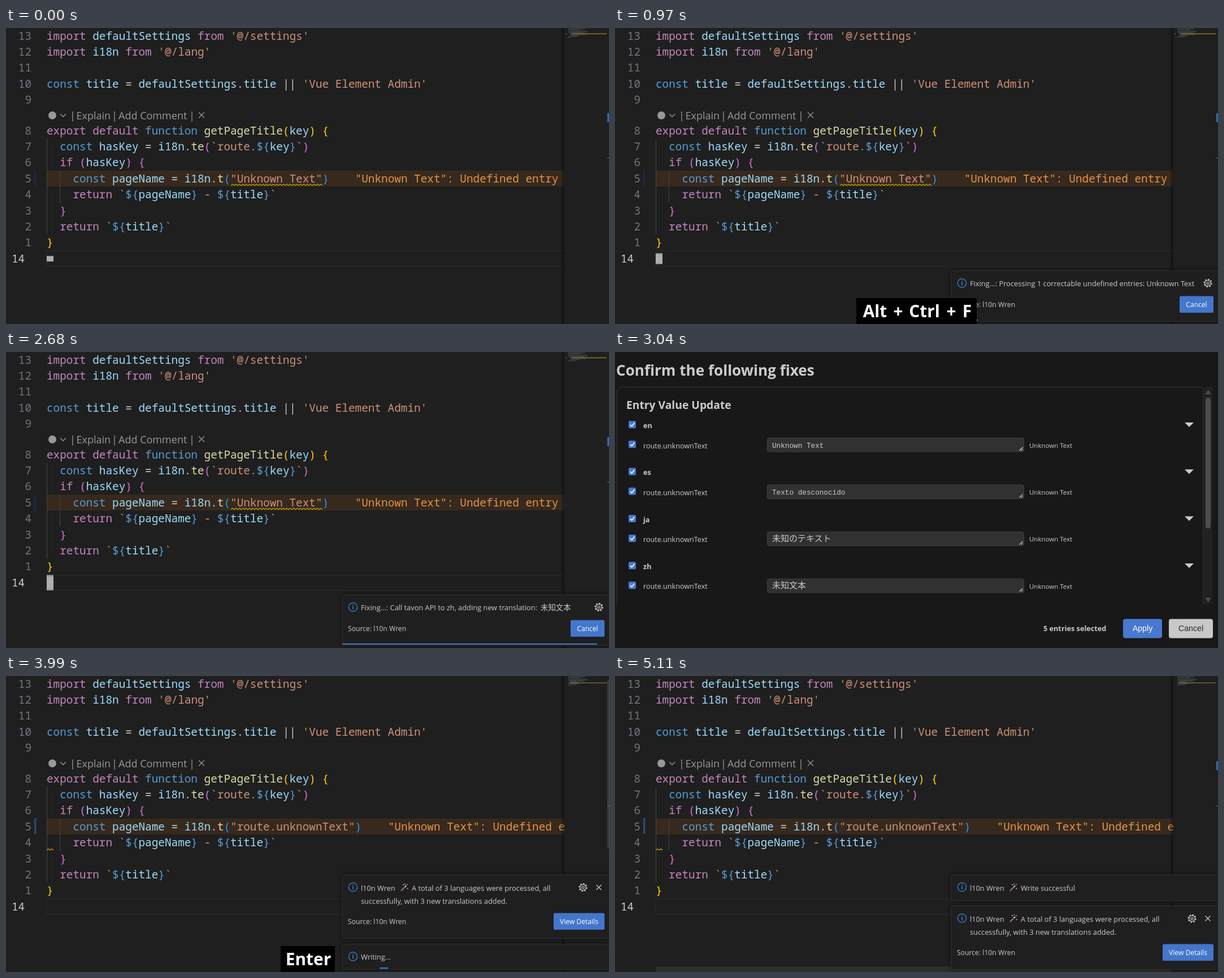
An HTML page that plays this animation: 1067x525 px, repeating every 5.59 s.

```html
<!DOCTYPE html>
<html lang="en">
<head>
<meta charset="utf-8">
<title>Fixing undefined entries</title>
<style>
html, body { margin: 0; width: 100%; height: 100%; overflow: hidden; background: #1f1f1f; }
svg { display: block; width: 1067px; height: 525px; }
text { white-space: pre; font-family: "Open Sans", "Noto Sans", "Noto Sans CJK JP", "Noto Sans CJK SC", sans-serif; }
.code { font: 19.35px "Noto Sans Mono", "DejaVu Sans Mono", monospace; }
.area { font-family: "Liberation Mono", "Noto Sans CJK JP", "Noto Sans CJK SC", monospace; }
.arial { font-family: "Liberation Sans", sans-serif; }
.bold { font-weight: 700; }
.end { text-anchor: end; }
.mid { text-anchor: middle; }
.k { fill: #c586c0 } .b { fill: #569cd6 } .v { fill: #9cdcfe } .f { fill: #dcdcaa } .s { fill: #ce9178 }
.y { fill: #ffd700 } .p { fill: #da70d6 } .n { fill: #179fff } .w { fill: #cccccc }
.h { fill: #e2954a }
.card { fill: #1f1f1f; stroke: #303031; filter: drop-shadow(0 0 4px #0007); }
.line { fill: none; stroke: #ccc; stroke-width: 1.2; }
#cursor, #seek { transform-box: fill-box; transform-origin: center; }
#bar { transform-box: fill-box; transform-origin: left; }
</style>
</head>
<body>
<svg viewBox="0 0 1067 525" id="stage"></svg>
<script>
const LOOP = 5590;
const BLUE = '#4476cb';
const CH = 11.61;
const $ = id => document.getElementById(id);

// ---- drawing helpers ----
const text = (x, y, size, str, fill = '#ccc', cls = '') =>
  `<text x="${x}" y="${y}" font-size="${size}" fill="${fill}" class="${cls}">${str}</text>`;
const rect = (x, y, w, h, fill, more = '') =>
  `<rect x="${x}" y="${y}" width="${w}" height="${h}" fill="${fill}" ${more}/>`;
const path = (d, stroke, width = 1, more = '') =>
  `<path d="${d}" fill="none" stroke="${stroke}" stroke-width="${width}" ${more}/>`;
const group = (id, ...parts) => `<g id="${id}">${parts.join('')}</g>`;
const cross = (x, y, r, stroke) =>
  path(`M${x - r} ${y - r}l${2 * r} ${2 * r}m0 ${-2 * r}l${-2 * r} ${2 * r}`, stroke, 1.2);

// Tokens come as class, string, class, string...
const code = (x, mid, ...tokens) => {
  let spans = '';
  for (let i = 0; i < tokens.length; i += 2) spans += `<tspan class="${tokens[i]}">${tokens[i + 1]}</tspan>`;
  return `<text class="code" x="${x}" y="${mid + 6.5}">${spans}</text>`;
};
const wave = (x0, x1, y) => {
  let d = `M${x0} ${y}`;
  for (let x = x0, up = true; x < x1; x += 3, up = !up) d += `l3 ${up ? -2.4 : 2.4}`;
  return path(d, '#cca700', 1.2);
};

// ---- editor ----
const row = n => n > 8 ? 14 + (13 - n) * 28.4 : 182 + (8 - n) * 28.4;
const LAST = row(0);

const numbers = () => {
  let out = '';
  for (let n = 13; n > 0; n--)
    out += `<text class="code end" x="45" y="${row(n) + 6.5}" fill="#6e7681">${n}</text>`;
  return out + `<text class="code" x="10" y="${LAST + 6.5}" fill="#ccc">14</text>`;
};

const fifth = (key, hintCol) =>
  code(72, row(5), 'b', '    const ', 'v', 'pageName ', 'w', '= ', 'v', 'i18n', 'w', '.', 'f', 't',
    'n', '(', 's', `"${key}"`, 'n', ')') +
  code(72 + hintCol * CH, row(5), 'h', '"Unknown Text": Undefined entry');

const lens = () =>
  '<circle cx="82" cy="155" r="7" fill="#999"/>' +
  path('M96 152.5l5 5 5-5', '#999', 1.3) +
  [118, 192, 329].map(x => text(x, 161.5, 18, '|', '#999', 'mid')).join('') +
  text(124.5, 161.5, 18, 'Explain', '#999') + text(199, 161.5, 18, 'Add Comment', '#999') +
  cross(346, 154.5, 5, '#999');

const minimap = () => {
  const lines = [[0, 30, 1], [0, 22, 2.5], [0, 34, 5], [0, 32, 7], [3, 24, 8.5], [3, 13, 10], [6, 26, 11.5],
    [3, 16, 13], [0, 14, 15], [0, 2, 16.5]];
  return rect(988, 0, 79, 525, '#1f1f1f') +
    lines.map(([x, w, y], i) => rect(995 + x, y, w, 1, i % 2 ? '#5d7f92' : '#6f6d80', 'opacity=".55"')).join('');
};

const hatch = () => {
  let d = '';
  for (let y = 255; y < 282; y += 3.5) d += `M50 ${y}l3.5 -2.5`;
  return path(d, '#3f7bd0', 1.5);
};

const editor = () =>
  rect(0, 0, 1067, 525, '#1f1f1f') +
  rect(72, 253, 916, 28, '#37291d') +
  rect(72, 395.5, 930, 27.5, 'none', 'stroke="#2c2c2c"') +
  path('M72.5 197V366', '#414744') + path('M95.5 253V310', '#414744') +
  numbers() + lens() +
  code(72, row(13), 'k', 'import ', 'v', 'defaultSettings ', 'k', 'from ', 's', "'@/settings'") +
  code(72, row(12), 'k', 'import ', 'v', 'i18n ', 'k', 'from ', 's', "'@/lang'") +
  code(72, row(10), 'b', 'const ', 'v', 'title ', 'w', '= ', 'v', 'defaultSettings', 'w', '.', 'v', 'title ',
    'w', '|| ', 's', "'Vue Element Admin'") +
  code(72, row(8), 'k', 'export default ', 'b', 'function ', 'f', 'getPageTitle', 'y', '(', 'v', 'key', 'y', ') {') +
  code(72, row(7), 'b', '  const ', 'v', 'hasKey ', 'w', '= ', 'v', 'i18n', 'w', '.', 'f', 'te', 'p', '(',
    's', '`route.', 'b', '${', 'v', 'key', 'b', '}', 's', '`', 'p', ')') +
  code(72, row(6), 'k', '  if ', 'p', '(', 'v', 'hasKey', 'p', ') {') +
  code(72, row(4), 'k', '    return ', 's', '`', 'b', '${', 'v', 'pageName', 'b', '}', 's', ' - ',
    'b', '${', 'v', 'title', 'b', '}', 's', '`') +
  code(72, row(3), 'p', '  }') +
  code(72, row(2), 'k', '  return ', 's', '`', 'b', '${', 'v', 'title', 'b', '}', 's', '`') +
  code(72, row(1), 'y', '}') +
  group('before', fifth('Unknown Text', 47), wave(398, 560, 279.5), rect(50, 253, 3, 28, '#1f2547')) +
  group('after', fifth('route.unknownText', 52), wave(72, 84, 309)) +
  group('changed', hatch()) +
  rect(72, 395.5, 12, 27.5, '#aeafad', 'id="cursor"') +
  rect(72, 515, 916, 10, '#2e2e2e', 'id="hscroll"') +
  minimap() +
  group('mapBefore', rect(1002, 9.5, 61, 1.5, '#8f7a1d'), rect(990, 9.5, 2, 1.5, '#3f6fae')) +
  group('mapAfter', rect(995, 11.5, 68, 1.5, '#6f6a2a')) +
  group('edge', rect(981, 0, 7, 525, 'url(#shade)'), rect(1064, 151, 3, 16, '#2a6fb0')) +
  rect(1064, 8, 3, 297, '#3b3b3b', 'id="slider"') +
  rect(1064, 230, 3, 1, '#777');

// ---- notifications ----
const info = y => `<circle cx="614" cy="${y}" r="7.6" fill="none" stroke="#3f86e0" stroke-width="1.3"/>` +
  rect(613.3, y - 1.5, 1.5, 5.5, '#3f86e0') + rect(613.3, y - 4.2, 1.5, 1.7, '#3f86e0');
const gear = (x, y) =>
  `<circle class="line" cx="${x}" cy="${y}" r="5.2"/><circle class="line" cx="${x}" cy="${y}" r="2"/>` +
  `<circle class="line" cx="${x}" cy="${y}" r="6.6" style="stroke-width:2;stroke-dasharray:2.6 2.58"/>`;
const wand = y => path(`M699 ${y + 6}l7-7`, '#8a8088', 2) +
  path(`M706 ${y - 1}l2-2`, '#eee', 2) +
  [[703, -5, '#f0a860'], [710, -5, '#e8788c'], [710.5, 2, '#f0a860'], [706, -6, '#e8788c']]
    .map(([x, dy, c]) => `<circle cx="${x}" cy="${y + dy}" r="1.1" fill="${c}"/>`).join('');

const card = (top, h) => rect(594.5, top + .5, 474, h, '', 'class="card" rx="4"') + info(top + 22.5);
const say = (x, y, s) => text(x, y, 12.8, s);
const button = (x, y, w, s) => rect(x, y, w, 29.5, BLUE, 'rx="2"') + text(x + w / 2, y + 19.2, 12.1, s, '#fff', 'mid');
const source = y => text(605, y, 12.2, 'Source: l10n Wren');
const brand = y => say(628, y + 5.5, 'l10n Wren') + wand(y);
const clip = (id, y, h) => `<clipPath id="${id}"><rect x="588" y="${y}" width="479" height="${h}"/></clipPath>`;
const slot = (id, clipId, ...parts) => `<g clip-path="url(#${clipId})">${group(id, ...parts)}</g>`;

const fixing = (id, top, first, tail = '', second = '') => group(id, card(top, top > 420 ? 90 : 113),
  gear(1049, top + 22.5), say(628, top + 28, 'Fixing...: ' + first),
  text(946, top + 28, 13.4, tail), text(628, top + 51, 13.4, second));
const call = lang => `Call tavon API to ${lang}, adding new translation:`;

const toasts = () =>
  group('fix', slot('fixIn', 'clipFix',
    fixing('msg0', 430, 'Processing 1 correctable undefined entries: Unknown Text'),
    fixing('msg1', 407, call('es'), 'Texto', 'desconocido'),
    fixing('msg2', 407, call('ja'), '未知のテキス', 'ト'),
    fixing('msg3', 430, call('zh'), '未知文本'),
    source(494.5), button(999, 475.5, 60, 'Cancel'),
    rect(595, 517, 472, 2, '#3f7bd0', 'id="bar"'))) +
  slot('done', 'clipDone', card(352, 46), brand(375), say(718, 380.5, 'Write successful')) +
  group('sum', slot('sumIn', 'clipSum', card(352, 113), brand(375),
    say(718, 380.5, 'A total of 3 languages were processed, all'),
    say(628, 403.5, 'successfully, with 3 new translations added.'),
    gear(1021, 375), cross(1049, 375, 4.5, '#ccc'), source(439.5), button(969, 420.5, 90, 'View Details'))) +
  group('write', slot('writeIn', 'clipWrite', card(475, 45), say(628, 503, 'Writing...'),
    rect(595, 517, 9.44, 2, '#3f7bd0', 'id="seek"')));

// ---- confirmation page ----
const check = y => rect(24, y - 6.5, 13, 13, '#4878cf', 'rx="2"') + path(`M27 ${y}l2.8 3 4.6-6`, '#fff', 1.7);
const entry = (lang, value, i) => {
  const y = i * 83.3;
  const size = i < 2 ? 12.7 : 15;
  return check(128.8 + y) + text(50, 135 + y, 12.6, lang, '#ccc', 'bold') +
    `<path d="M1008 ${125 + y}h16l-8 8z" fill="#ccc"/>` +
    check(163.8 + y) + text(50, 170.5 + y, 12.6, 'route.unknownText') +
    rect(269.5, 152.5 + y, 454, 24.5, '#313131', 'rx="3" stroke="#3f3f3f"') +
    text(278, 169.5 + y, size, value, '#ccc', 'area') +
    path(`M715.5 ${175 + y}l6-6m-2.5 6l2.5-2.5`, '#ddd', 1.1) +
    text(733, 169.8 + y, 11.5, 'Unknown Text');
};
const dialog = () => group('dialog',
  rect(0, 0, 1067, 525, '#181818'),
  text(2, 42, 26.1, 'Confirm the following fixes', '#ccc', 'bold'),
  path('M3.5 447V70q0-8 8-8H1033q8 0 8 8V447', '#363636'),
  text(20, 101, 19.3, 'Entry Value Update', '#ccc', 'bold'),
  ['Unknown Text', 'Texto desconocido', '未知のテキスト', '未知文本']
    .map((v, i) => entry(['en', 'es', 'ja', 'zh'][i], v, i)).join(''),
  rect(1042, 62, 15, 385, '#212121'),
  rect(1045, 81, 9, 232, '#4d4d4d', 'rx="4.5"'),
  '<path d="M1044.5 75h10l-5-8zM1044.5 436h10l-5 8z" fill="#4d4d4d"/>',
  text(758, 494.5, 12.7, '5 entries selected', '#ccc', 'bold'),
  rect(899, 473.5, 69, 34, '#4878cf', 'rx="4"'), text(933.5, 495, 14.2, 'Apply', '#fff', 'arial mid'),
  rect(980, 473.5, 78, 34, '#c8c8c8', 'rx="4"'), text(1019, 495, 14.2, 'Cancel', '#2a2a2a', 'arial mid'));

// ---- pressed keys ----
const keys = (id, x, w, parts) => group(id, rect(x, 479, w, 46, '#000'),
  parts.map(([cx, s]) => text(cx, 512.5, 29.8, s, '#fff', 'bold mid')).join(''));

$('stage').innerHTML =
  '<defs><linearGradient id="shade"><stop stop-color="#000" stop-opacity="0"/>' +
  '<stop offset="1" stop-color="#000" stop-opacity=".4"/></linearGradient>' +
  clip('clipFix', 402, 123) + clip('clipDone', 347, 56) + clip('clipSum', 347, 123) + clip('clipWrite', 470, 55) +
  '</defs>' + editor() + toasts() + dialog() +
  keys('chord', 427, 213, [[460, 'Alt'], [501, '+'], [547.5, 'Ctrl'], [595, '+'], [623, 'F']]) +
  keys('enter', 486, 96, [[535, 'Enter']]);

// ---- motion ----
const play = (id, ...frames) => $(id).animate(
  frames.map(([ms, props, easing = 'linear']) => ({ offset: ms / LOOP, easing, ...props })),
  { duration: LOOP, iterations: Infinity });
const fade = opacity => ({ opacity });
const show = (id, from, to) => {
  const keys = [[from, fade(1), 'step-end'], [to, fade(0), 'step-end']];
  if (from > 0) keys.unshift([0, fade(0), 'step-end']);
  if (to < LOOP) keys.push([LOOP, fade(0)]);
  play(id, ...keys);
};
const slideIn = (id, start, height) => {
  const low = { transform: `translateY(${height}px)`, opacity: 0 };
  const up = { transform: 'translateY(0px)', opacity: 1 };
  play(id, [0, low], [start, low, 'ease-out'], [start + 300, up], [LOOP, up]);
};

const BACK = 3370, WRITTEN = 4060;

show('before', 0, BACK);
show('mapBefore', 0, BACK);
show('after', BACK, LOOP);
show('mapAfter', BACK, LOOP);
show('changed', 3700, LOOP);
show('dialog', 2940, BACK);
show('chord', 620, 1720);
show('enter', BACK, 4340);

show('fix', 600, 2940);
show('msg0', 0, 1230);
show('msg1', 1230, 1600);
show('msg2', 1600, 1960);
show('msg3', 1960, LOOP);
slideIn('fixIn', 600, 90);
show('write', BACK, WRITTEN);
slideIn('writeIn', 3383, 45);
slideIn('sumIn', 3466, 113);
slideIn('done', 4740, 46);

const moved = y => ({ transform: `translateY(${y}px)` });
play('sum', [0, moved(0), 'step-end'], [WRITTEN, moved(55), 'step-end'], [LOOP, moved(55)]);

play('edge', [0, fade(1), 'step-end'], [BACK, fade(0), 'step-end'], [3700, fade(1)], [LOOP, fade(1)]);
play('slider', [0, fade(0), 'step-end'], [BACK, fade(1)], [4760, fade(1)], [5110, fade(0)], [LOOP, fade(0)]);
play('hscroll', [0, fade(0)], [WRITTEN, fade(0)], [4160, fade(1)], [LOOP, fade(1)]);

const wide = s => ({ transform: `scaleX(${s})` });
play('bar', [0, wide(.1)], [1230, wide(.1)], [1330, wide(.385)], [1600, wide(.385)], [1700, wide(.67)],
  [1960, wide(.67)], [2060, wide(.955)], [LOOP, wide(.955)]);

const seek = (x, s) => ({ transform: `translateX(${x}px) scaleX(${s})` });
play('seek', [0, seek(0, 1)], [3407, seek(0, 1)], [WRITTEN, seek(77.1, 1.653)], [LOOP, seek(77.1, 1.653)]);

const tall = s => ({ transform: `scaleY(${s})` });
const soft = 'ease-in-out';
play('cursor', [0, tall(.36), 'ease-out'], [125, tall(0)], [355, tall(0), soft], [655, tall(1)],
  [855, tall(1), soft], [1155, tall(0)], [1420, tall(0), soft], [1720, tall(1)], [1920, tall(1), soft],
  [2220, tall(0)], [2420, tall(0), soft], [2720, tall(1)], [2940, tall(1), 'step-end'],
  [BACK, tall(0)], [LOOP, tall(0)]);
</script>
</body>
</html>
```
